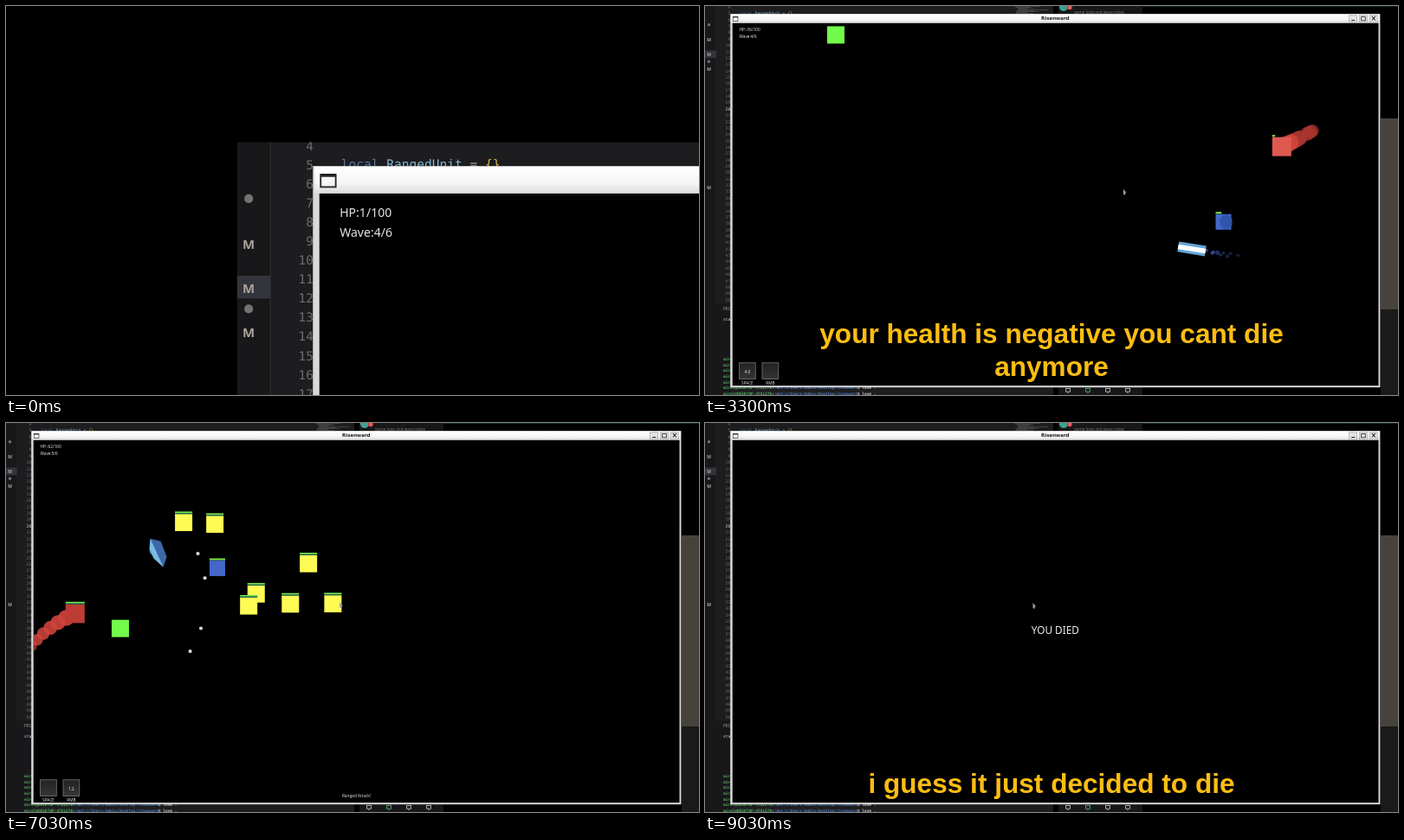
An HTML page with a canvas that plays this animation: 800 by 450 pixels, repeating every 9060 ms.

```html
<!DOCTYPE html>
<html lang="en">
<head>
<meta charset="utf-8">
<title>Game clip</title>
<style>
html, body { margin: 0; width: 100%; height: 100%; overflow: hidden; background: #000; }
canvas { display: block; width: 800px; height: 450px; }
</style>
</head>
<body>
<canvas id="stage" width="800" height="450"></canvas>
<script>
const ctx = document.getElementById('stage').getContext('2d');
const LOOP = 9060, ZOOM_END = 600, HIT = 350, BLINK = 3280, WAVE5 = 6900, TELEPORT = 7370, DEATH = 7960;
const VOLLEY = 5466, VOLLEY2 = 6811, SHOT_SPEED = .56;
const MONO = '"DejaVu Sans Mono", monospace';
const SANS = '"Noto Sans", sans-serif';

// Straight legs through [time, x, y], continued past both ends
const glide = (...stops) => t => {
  let i = 1;
  while (i < stops.length - 1 && stops[i][0] < t) i++;
  const [a, b] = [stops[i - 1], stops[i]];
  const k = (t - a[0]) / (b[0] - a[0]);
  return [a[1] + (b[1] - a[1]) * k, a[2] + (b[2] - a[2]) * k];
};

// Smooth curve through [time, x, y, heading in degrees, speed in px/s]
const charge = (...stops) => t => {
  const push = (s, axis) => s[4] / 1000 * (axis ? Math.sin : Math.cos)(s[3] * Math.PI / 180);
  const last = stops[stops.length - 1];
  const end = t <= stops[0][0] ? stops[0] : t >= last[0] ? last : null;
  if (end) return [0, 1].map(n => end[n + 1] + push(end, n) * (t - end[0]));
  const i = stops.findIndex(s => s[0] > t);
  const a = stops[i - 1], b = stops[i], span = b[0] - a[0], k = (t - a[0]) / span;
  const ease = k * k * (3 - 2 * k);
  return [0, 1].map(n => a[n + 1] + (b[n + 1] - a[n + 1]) * ease
    + span * (push(a, n) * k * (1 - k) ** 2 - push(b, n) * k * k * (1 - k)));
};

const firstWalk = glide([730, 685, 200], [2210, 692, 315]);
const secondWalk = glide([4480, 145, 98], [5850, 138, 173]);
const green = t => t < BLINK ? firstWalk(t) : t < TELEPORT ? secondWalk(t) : [384, 214];
const blueA = glide([730, 561, 176], [2210, 618, 215]);
const blueB = glide([730, 578, 194], [2210, 636, 231], [4480, 558, 270], [5850, 438, 233], [7670, 139, 133]);
const yellow = glide([730, 611, 193], [2210, 672, 254.5]);
const cursor = glide([730, 653, 168], [2210, 654, 206], [4480, 299, 220], [5850, 409, 206],
  [TELEPORT, 379, 209], [LOOP, 379, 209]);
const dasher = charge([730, 606, 168, -38, 340], [2210, 695, 279, 65, 60], [4480, 169, 209, 190, 400],
  [5850, 251, 174, 195, 350], [7670, 157, 141, 197, 160]);
const redA = charge([2210, 757, 111, 150, 100], [4480, 540, 180, 187, 135]);
const redB = charge([WAVE5, 34, 253, -50, 400], [7670, 402, 222, 24, 340]);
const crowd = [[192, 137], [224, 136], [325, 171], [264, 204], [255, 216], [303, 213], [352, 212]];

const captions = [
  [1500, 2700, 'oh nonono'],
  [3000, 4800, 'your health is negative you cant die', 'anymore'],
  [5000, 6800, 'i thought it’s supposed to check if its', 'less than or equal to 0'],
  [8050, LOOP, 'i guess it just decided to die']
];
const statuses = [[0, 1500, 'Ranged Attack!'], [1500, BLINK, 'Melee Attack!'],
  [VOLLEY, TELEPORT, 'Ranged Attack!'], [TELEPORT, DEATH, 'Teleported!']];
// Cooldown length, then cast and reset times
const space = { length: 4000, casts: [[-1670, 2330], [BLINK, 5200], [TELEPORT, DEATH]] };
const rmb = { length: 1384, casts: [[-346, 1038], [VOLLEY, VOLLEY2], [VOLLEY2, TELEPORT]] };

const noise = n => { const v = Math.sin(n * 127.1) * 43758.5453; return v - Math.floor(v); };
const during = (list, t) => list.find(e => t >= e[0] && t < e[1]);

function box(x, y, w, h, fill) {
  ctx.fillStyle = fill;
  ctx.fillRect(x, y, w, h);
}

function frame(x, y, w, h, color, line = 1) {
  ctx.strokeStyle = color;
  ctx.lineWidth = line;
  ctx.strokeRect(x, y, w, h);
}

function disc(x, y, r, fill, alpha = 1) {
  ctx.globalAlpha = alpha;
  ctx.fillStyle = fill;
  ctx.beginPath();
  ctx.arc(x, y, r, 0, 7);
  ctx.fill();
  ctx.globalAlpha = 1;
}

function poly(points, fill) {
  ctx.fillStyle = fill;
  ctx.beginPath();
  points.forEach(p => ctx.lineTo(p[0], p[1]));
  ctx.fill();
}

function octagon(x, y, fill) {
  poly(Array.from({ length: 8 }, (_, i) => {
    const a = (i + .5) * Math.PI / 4;
    return [x + 7.5 * Math.cos(a), y + 9 * Math.sin(a)];
  }), fill);
}

function text(s, x, y, font, fill, align = 'left') {
  ctx.font = font;
  ctx.fillStyle = fill;
  ctx.textAlign = align;
  ctx.fillText(s, x, y);
}

// Coloured pieces of one line, set one after another
function run(x, y, font, ...pieces) {
  for (const [s, fill] of pieces) {
    text(s, x, y, font, fill);
    x += ctx.measureText(s).width;
  }
}

function drawEditor() {
  box(0, 0, 403, 450, '#1d1d1f');
  box(0, 0, 13, 450, '#18181a');
  box(12.6, 0, .5, 450, '#2a2c2a');
  box(0, 51.5, 12.8, 8.8, '#34343c');
  for (const y of [39.2, 56.3, 73.3, 210.2])
    text('M', 4.5, y + 1.8, 'bold 5px "Open Sans", sans-serif', '#aaa397', 'center');
  for (const y of [21.8, 64.3]) disc(4.5, y, 1.7, '#727272');
  for (let n = 4; n <= 50; n++)
    text(n, 29.4, 10.4 + (n - 5) * 7.36, '4.8px ' + MONO, n === 20 ? '#d8d8d8' : '#6d6d70', 'right');
  run(40, 10.3, '4.85px ' + MONO, ['local ', '#5579a0'], ['RangedUnit', '#7fb4d3'], [' = ', '#aaa'], ['{}', '#d6b13d']);
  for (let i = 0; i < 9; i++)
    box(357 + noise(i) * 5, i, 10 + noise(i + 20) * 26, .6, '#555');

  box(0, 344, 30, 106, '#18181a');
  text('PROBLEMS', 21, 352, '4.6px ' + SANS, '#999');
  text('start', 21, 364, '4.5px ' + MONO, '#ddd');
  for (let i = 0; i < 7; i++)
    run(21, 409.8 + i * 6.7, 'bold 4.45px ' + MONO, ['mirel@DESKTOP-4TQLZ7B', '#4fae5d'], [':', '#bbb'],
      ['/mnt/c/Users/Admin/Desktop/risenward', '#4a78c0'], ['$ love .', '#ccc']);
}

function drawDesktop() {
  box(402, 0, 398, 450, '#000');
  box(408, 0, 97, 450, '#171719');
  disc(414, 1, 5, '#3fa18f');
  disc(421, 1.5, 3, '#d83b3b');
  text('2', 421, 3.2, '4px ' + SANS, '#fff', 'center');
  text('game loop and wave notes', 426, 9.2, '4.6px ' + SANS, '#777');
  box(505, 0, 295, 1, '#0b2612');
  box(780, 130, 20, 221, '#47433c');
  box(780, 351, 20, 99, '#1a1a1a');
  for (let i = 0; i < 4; i++) {
    const x = 416.5 + i * 23, color = i === 1 ? '#4b9d60' : '#aaa';
    frame(x, 442.5, 5, 3.6, color);
    box(x + 1.5, 447, 2, .7, color);
  }
}

function drawWindow() {
  box(29.2, 9.2, 750.2, 432, '#d9d9d9');
  const g = ctx.createLinearGradient(0, 9.2, 0, 19.8);
  g.addColorStop(0, '#fff');
  g.addColorStop(.6, '#f6f6f6');
  g.addColorStop(1, '#dcdcdc');
  box(29.8, 9.5, 749, 10.3, g);
  box(31.7, 19.8, 745.8, 419.4, '#000');
  frame(32.2, 12.5, 5.8, 4.8, '#222', .6);
  box(32.2, 12.2, 5.8, 1.2, '#222');
  text('Risenward', 404.3, 16.4, 'bold 5.5px "DejaVu Sans", sans-serif', '#222', 'center');
  for (let i = 0; i < 3; i++) {
    const x = 743.7 + i * 11.7;
    box(x, 10.8, 9, 8, '#e4e4e4');
    frame(x, 10.8, 9, 8, '#999', .6);
  }
  box(746.2, 16, 4, 1, '#222');
  frame(757.7, 12.6, 4.6, 4.2, '#222', .8);
  text('×', 771.8, 17.4, 'bold 8px "DejaVu Sans", sans-serif', '#222', 'center');
}

function drawUnit([x, y], size, fill, bar = 0, full = false) {
  const h = size / 2;
  box(x - h, y - h, size, size, fill);
  if (full) box(x - h, y - h - 2.6, size, 3, '#17604a');
  box(x - h, y - h - 2.5, size * bar, full ? 1.5 : 2, '#7fe84a');
}

// Puffs shrink with their distance from the unit
function redTrail(path, t) {
  const [hx, hy] = path(t);
  for (let i = 17; i >= 0; i--) {
    const age = i / 17;
    if (age > .62 && age < .78) continue;
    const [x, y] = path(t - age * 420);
    const r = 10 - Math.hypot(x - hx, y - hy) * .062;
    if (r > 1) disc(x, y, r, age < .3 ? '#cf443d' : '#ab362f', .95 - age * .3);
  }
}

function blueTrail(t) {
  for (let i = 12; i > 1; i--) {
    const age = i / 12;
    const [x, y] = dasher(t - age * 250);
    const spread = 10 * (1 - age * .5);
    disc(x + (noise(i) - .5) * spread, y + (noise(i + 40) - .5) * spread,
      1.2 + noise(i + 9) * 1.8 * (1 - age * .5), '#3a58ae', 1 - age * .8);
  }
}

function drawDasher(t) {
  const [x, y] = dasher(t), [px, py] = dasher(t - 1);
  const speed = Math.hypot(x - px, y - py);
  if (speed > .2) blueTrail(t);
  ctx.save();
  ctx.translate(x, y);
  if (speed < .12) {
    poly([[-9, -16], [3, -13], [10, 5], [6, 17], [-10, 0]], '#3f68a8');
    poly([[-9, -16], [6, 17], [-5, 7], [-10, -4]], '#79bde2');
  } else {
    ctx.rotate(Math.atan2(y - py, x - px));
    box(-16, -6, 32, 12, '#62a4d6');
    box(-16, -2.8, 32, 5.6, '#fff');
  }
  ctx.restore();
}

function drawVolley(t, start, x, y, aim) {
  const r = (t - start) * SHOT_SPEED;
  if (r < 10) return;
  for (const lane of [-2, -1, 1, 2]) {
    const a = (aim + lane * 13.7) * Math.PI / 180;
    const sx = x + r * Math.cos(a), sy = y + r * Math.sin(a);
    // Outer shots of a long flight have already struck
    if (r < 300 || lane * lane === 1) disc(sx, sy, 2.1, '#d6d6d0');
  }
}

function drawEmbers(t) {
  if (t < 2900) {
    disc(700, 57, 1.5, '#3a1512');
    for (let k = 0; k <= 1; k += 1 / 7)
      disc(722 + 55 * k, 46 - 23 * k, 2.6 + 4 * k, noise(k) > .5 ? '#c2392f' : '#8e2a24', .7 + .25 * k);
  }
  if (t > 7300)
    for (let i = 0; i < 5; i++) disc(34 + i * 5, 253 - i * .9, 3 - i * .4, '#b5362f', .9 - i * .19);
}

function drawCrowd(t) {
  const [gx, gy] = green(t);
  for (const [x, y] of crowd) {
    const dx = gx - x, dy = gy - y, move = (t - 7670) * .04 / Math.hypot(dx, dy);
    drawUnit([x + dx * move, y + dy * move], 20, '#fffb55', 1, true);
  }
}

function drawUnits(t) {
  drawEmbers(t);
  if (t < 2900) {
    const [x, y] = blueA(t), lit = t > 480 && t < 1000;
    if (lit) disc(x, y, 15.7, '#2c3e6d');
    drawUnit([x, y], 18, lit ? '#79acef' : '#4368c9', .6);
    if (!lit) octagon(x + 3, y, '#3055ab');
  }
  const [bx, by] = blueB(t);
  drawUnit([bx, by], 18, '#4368c9', t < WAVE5 ? .38 : 1);
  if (t > 1000 && t < 5000) octagon(bx + 3, by, '#3055ab');
  if (t < 2750) drawUnit(yellow(t), 20, '#fffb55');
  drawUnit(green(t), 20, '#73fb4b');
  if (t > WAVE5) drawCrowd(t);
  drawDasher(t);
  if (t > 1700 && t < 5000) {
    const [x, y] = redA(t), angry = t > BLINK;
    if (angry) redTrail(redA, t);
    drawUnit([x, y], 22, angry ? '#de5a51' : '#c53d34', angry ? .15 : .28);
    if (!angry) octagon(x + 5.5, y - 1, '#5d30a6');
  }
  if (t > WAVE5) {
    redTrail(redB, t);
    drawUnit(redB(t), 22, '#bd3c36', 1, true);
  }
  if (t < VOLLEY2) drawVolley(t, VOLLEY, 131, 144, 1.3);
  drawVolley(t, VOLLEY2, 108, 199, 4.5);
}

function drawSkill(x, label, skill, t) {
  const g = ctx.createLinearGradient(0, 413, 0, 432);
  g.addColorStop(0, '#222');
  g.addColorStop(1, '#363636');
  box(x, 412.8, 18.8, 18.8, g);
  frame(x, 412.8, 18.8, 18.8, '#777', .8);
  text(label, x + 9.4, 437.5, '4.7px ' + SANS, '#ddd', 'center');
  const cast = during(skill.casts, t);
  if (cast) {
    const left = (cast[0] + skill.length - t) / 1000;
    text(left.toFixed(1), x + 9.4, 424.7, '4.7px ' + SANS, '#eee', 'center');
  }
}

function drawHud(t) {
  const hp = t < HIT ? 1 : t < WAVE5 ? -36 : -62;
  text('HP:' + hp + '/100', 39.5, 28.9, '4.7px ' + SANS, '#e4e4e4');
  text('Wave:' + (t < WAVE5 ? 4 : 5) + '/6', 39.5, 36.6, '4.7px ' + SANS, '#e4e4e4');
  drawSkill(39.5, 'SPACE', space, t);
  drawSkill(66, 'RMB', rmb, t);
  const status = during(statuses, t);
  if (status) text(status[2], 404.5, 433, '4.7px ' + SANS, '#ddd', 'center');
}

function drawCursor(t) {
  const [x, y] = cursor(t);
  poly([[x - .5, y - 1], [x - .5, y + 5], [x + 1.8, y + 6], [x + 1.6, y + 3.6], [x + 3.3, y + 3.4]], '#9c9c9c');
}

function drawCaption(t) {
  const caption = during(captions, t);
  if (!caption) return;
  const lines = caption.slice(2);
  lines.forEach((line, i) => text(line, 400, 428 - (lines.length - 1 - i) * 38,
    'bold 31.6px "Liberation Sans", Arial, sans-serif', '#ffbd12', 'center'));
}

function clip(x, y, w, h) {
  ctx.beginPath();
  ctx.rect(x, y, w, h);
  ctx.clip();
}

function draw(t) {
  box(0, 0, 800, 450, '#000');
  const k = Math.min(1, t / ZOOM_END);
  const zoom = 1 - (k < .5 ? 4 * k ** 3 : 1 - (2 - 2 * k) ** 3 / 2);
  ctx.save();
  ctx.translate(266.67 * zoom, 157.5 * zoom);
  ctx.scale(1 + 2 * zoom, 1 + 2 * zoom);
  clip(0, 0, 800, 450);
  drawEditor();
  drawDesktop();
  drawWindow();
  clip(31.7, 19.8, 745.8, 419.4);
  if (t < DEATH) {
    drawUnits(t);
    drawHud(t);
  } else {
    text('YOU DIED', 404.3, 244, '11.8px ' + SANS, '#eee', 'center');
  }
  drawCursor(t);
  ctx.restore();
  drawCaption(t);
}

const begin = performance.now();
function tick() {
  draw((performance.now() - begin) % LOOP);
  requestAnimationFrame(tick);
}
tick();
</script>
</body>
</html>
```
